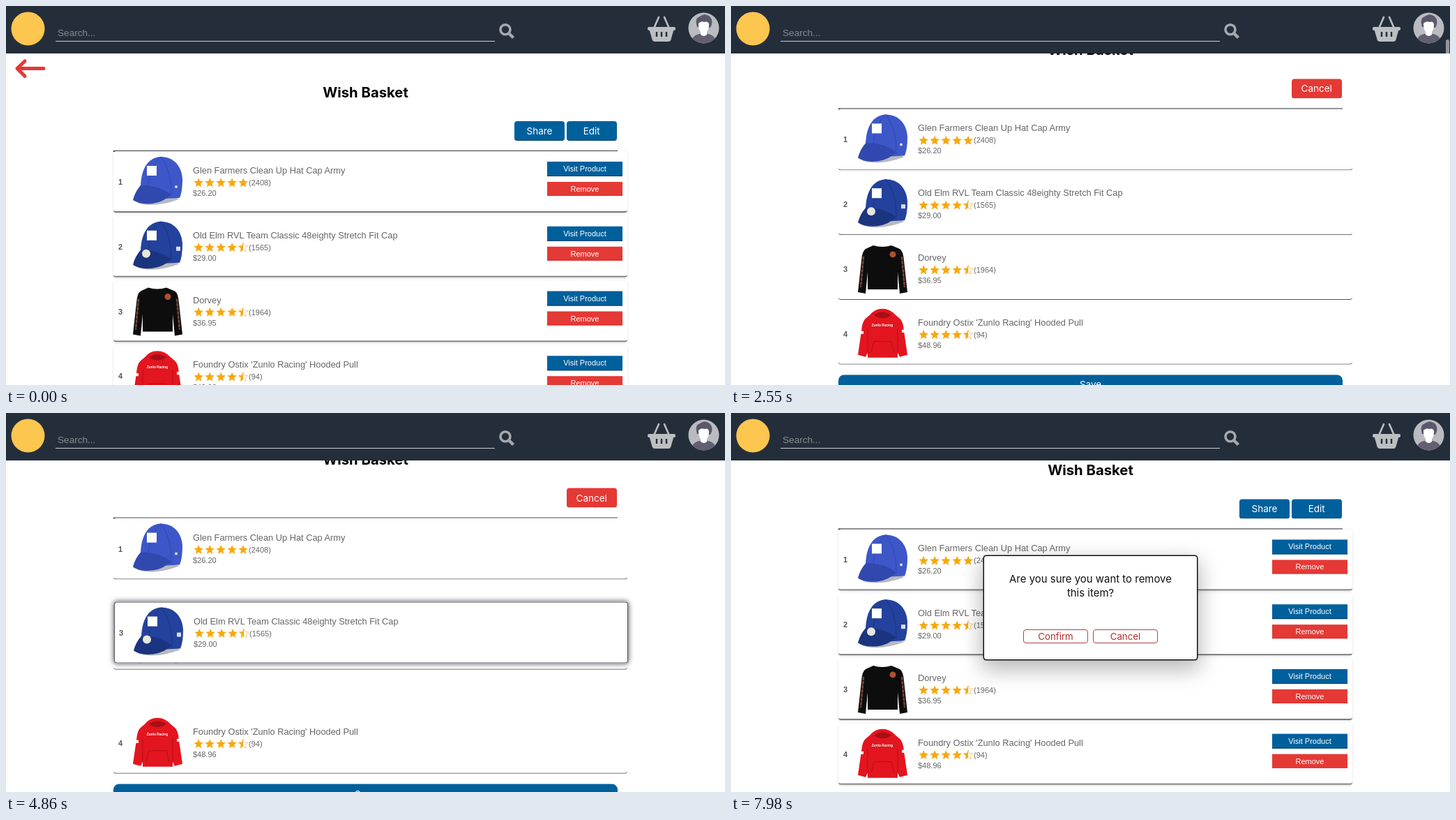
Animation, 1031 px wide and 543 px high, one loop 8 s. Source, as an HTML page:

```html
<!DOCTYPE html>
<html lang="en">
<head>
<meta charset="utf-8">
<title>Wish Basket</title>
<style>
html, body { margin: 0; width: 100%; height: 100%; overflow: hidden; background: #fff; }
body { position: relative; font: 11px "Liberation Sans", Arial, sans-serif; color: #666; }
div, svg { position: absolute; box-sizing: border-box; }
svg { overflow: visible; }
#page, #list { left: 0; top: 0; width: 1031px; }
#header { left: 0; top: -2px; width: 1031px; height: 70px; background: #242e3b; }
#header svg { left: 0; top: 2px; }
#search { left: 74px; top: 31px; font-size: 13.6px; line-height: 20px; color: #868a90; }
#thumb { left: 1025px; width: 5px; height: 440px; border-radius: 3px; background: rgba(255,255,255,.5); }
#title { left: 0; top: 109px; width: 1031px; text-align: center; color: #000; font: bold 20.3px/30px Inter, sans-serif; }
#rule { left: 154px; top: 207px; width: 723px; height: 2px; background: #3a3a40; }
.btn { text-align: center; color: #fff; background: #00609c; border-bottom: 1px solid #003a63; }
.big { top: 164.5px; height: 28.5px; border-radius: 4px; font: 13.5px/28px Inter, sans-serif; }
.red { background: #e53935; border-bottom-color: #d32f2f; }
.hover { background: #004f82; }
#save { left: 154px; top: 589px; width: 723px; border-radius: 8px; }
.card { left: 154px; top: 208px; width: 737px; height: 87.75px; background: #fff; border-radius: 4px; border-bottom: 1px solid #444; }
.view .card { border-bottom: 2px solid #777; box-shadow: 0 1px 3px rgba(0,0,0,.16); }
.card .text { white-space: nowrap; line-height: 20px; }
.name { font-size: 12.8px; }
.num { width: 20px; text-align: center; font-weight: bold; color: #555; }
.card .btn { left: 622px; width: 108px; }
.visit { top: 14.5px; height: 21.5px; line-height: 21px; }
.remove { top: 44px; height: 20px; line-height: 20px; }
.editOnly, .edit .viewOnly { display: none; }
.edit .editOnly { display: block; }
#modal { left: 362px; top: 204px; width: 307px; height: 150px; background: #fff; border: 1.5px solid #111;
  border-radius: 4px; box-shadow: 0 11px 30px 3px rgba(0,0,0,.28), 0 0 0 .5px #111; color: #111; text-align: center; font: 14.95px/19.5px Inter, sans-serif; }
#modal div { left: 0; width: 305px; top: 24px; }
#modal .choice { top: 105px; width: 93px; height: 20px; border: 1px solid #b04440; border-radius: 4px; color: #ac2f2b;
  font-size: 13.3px; line-height: 18px; }
</style>
</head>
<body>
<div id="page">
  <svg class="viewOnly" width="70" height="110" fill="none" stroke="#e53935" stroke-width="5" stroke-linecap="round" stroke-linejoin="round">
    <path d="M27 79 16 89.5 27 100.5M17 89.5H54"/></svg>
  <div id="title">Wish Basket</div>
  <div class="btn big viewOnly" style="left:729px;width:72px">Share</div>
  <div class="btn big viewOnly" id="edit" style="left:804px;width:71.5px">Edit</div>
  <div class="btn big red editOnly" style="left:804px;width:71.5px;top:165px;height:27.5px">Cancel</div>
  <div id="rule"></div>
  <div id="list"></div>
  <div class="btn big editOnly" id="save">Save</div>
</div>
<div id="header">
  <svg width="1031" height="68">
    <circle cx="31.5" cy="32.5" r="24" fill="#fdc64f"/>
    <path d="M71 50.5H701" stroke="#c9ccd0"/>
    <g fill="none" stroke="#a5a8ad" stroke-width="3.6"><circle cx="716" cy="33.8" r="7"/><path d="M721 39 727.5 45.5" stroke-width="4.5"/></g>
    <path d="M936 16 929 32M944 16 951 32" stroke="#bcbec1" stroke-width="2.6" stroke-linecap="round"/>
    <g fill="#bcbec1"><rect x="920" y="30" width="40" height="5" rx="2"/><path d="M922.5 34H957.5L953.5 48Q952.5 51 950 51H930Q927.5 51 926.5 48Z"/></g>
    <path d="M933 37V44M940 37V44M947 37V44" stroke="#242e3b" stroke-width="2.4"/>
    <clipPath id="round"><circle cx="1000.5" cy="31.5" r="22"/></clipPath>
    <g clip-path="url(#round)">
      <path d="M975 8H1025V56H975Z" fill="#babbc0"/>
      <path d="M983 54Q983 42 994 40H1007Q1018 42 1018 54Z" fill="#636073"/>
      <path d="M991 30Q987 17 995 15Q1002 9 1010 16Q1015 22 1010 31Z" fill="#5b586c"/>
      <path d="M993 25Q997 21 1001 23Q1007 21 1008 26Q1008 34 1005 37V41Q1001 45 996 41V37Q993 34 993 25Z" fill="#fff"/>
    </g>
  </svg>
  <div id="search">Search...</div>
</div>
<div id="thumb"></div>
<div id="modal">
  <div>Are you sure you want to remove<br>this item?</div>
  <div class="choice" style="left:56px">Confirm</div>
  <div class="choice" style="left:156px">Cancel</div>
</div>
<script>
const $ = id => document.getElementById(id);
const PITCH = 92.75;

const STAR = 'M12 17.27 18.18 21 16.54 13.97 22 9.24 14.81 8.63 12 2 9.19 8.63 2 9.24 7.46 13.97 5.82 21Z';
const HALF = 'M12 2 9.19 8.63 2 9.24 7.46 13.97 5.82 21 12 17.27Z';

const cap = (crown, brim, extra) => `
  <path d="M6 66Q30 74 66 61L55 54Z" fill="#b9bac0"/>
  <path d="M11 42C12 16 22 1 40 0C59 0 70 14 71 32Q71 50 67 59L46 60Z" fill="${crown}"/>
  <path d="M40 0Q56 20 55 57M40 0Q25 12 22 41" fill="none" stroke="${brim}"/>
  <path d="M11 41Q3 50 0 62Q10 69 28 67Q44 65 55 54Q36 40 11 41Z" fill="${brim}"/>
  <rect x="20" y="13" width="14" height="14" fill="#fff"/>${extra}`;
const sweater = color => `<path d="M22 2Q35 6 48 2L60 7Q65 10 66 24L71 69 60 71 57 40V65H14V40L11 71 0 69 5 24Q6 10 11 7Z" fill="${color}"/>`;
const hoodie = color => `<path d="M17 9Q24 0 35 0T54 9L60 14Q65 18 66 32L71 66 60 69 57 63V70H14V63L11 69 0 66 5 32Q6 18 11 14Z" fill="${color}"/>`;

const items = [
  { name: 'Glen Farmers Clean Up Hat Cap Army', stars: 5, votes: 2408, price: '26.20',
    art: cap('#3d57c9', '#3148ae', '<circle cx="62" cy="43" r="2" fill="#dde"/>') },
  { name: 'Old Elm RVL Team Classic 48eighty Stretch Fit Cap', stars: 4.5, votes: 1565, price: '29.00',
    art: cap('#23429d', '#1b3480', '<circle cx="19" cy="46" r="6" fill="#e8e6dc"/><rect x="62" y="36" width="6" height="6" fill="#dde"/>') },
  { name: 'Dorvey', stars: 4.5, votes: 1964, price: '36.95',
    art: sweater('#0d0d0e') + `<path d="M8 18 4 62M63 18 67 62" stroke="#7a4634" stroke-width="2.5" stroke-dasharray="5 1"/>
      <circle cx="50" cy="15" r="4.5" fill="#b0502f"/>` },
  { name: "Foundry Ostix 'Zunlo Racing' Hooded Pull", stars: 4.5, votes: 94, price: '48.96',
    art: hoodie('#e3151f') + `<path d="M23 9Q35 0 48 9Q35 18 23 9Z" fill="#a80e16"/>
      <path d="M14 28V63M57 28V63M19 63 23 47H48L52 63" fill="none" stroke="#b50f18"/>
      <text x="35" y="25" text-anchor="middle" font-size="4.8" font-weight="bold" fill="#fff">Zunlo Racing</text>
      <path d="M3 32H8V36H3ZM63 30H68V34H63Z" fill="#fff"/>` },
];

const text = (cls, x, midY, value) => `<div class="text ${cls}" style="left:${x}px;top:${midY - 10}px">${value}</div>`;
const star = (i, rating) => `<g transform="translate(${16 * i}) scale(.68)">` + (rating > i + .5
  ? `<path d="${STAR}" fill="#f7a80d"/>`
  : `<path d="${HALF}" fill="#f7a80d"/><path d="${STAR}" fill="none" stroke="#f2b64a"/>`) + '</g>';

const cards = items.map(item => {
  const card = document.createElement('div');
  card.className = 'card';
  card.innerHTML = text('num', 0, 43.5, '') +
    `<svg width="71" height="70" style="left:28px;top:8px">${item.art}</svg>` +
    text('name', 114, 28, item.name) +
    `<svg width="80" height="16" style="left:114px;top:37px">${[0, 1, 2, 3, 4].map(i => star(i, item.stars)).join('')}</svg>` +
    text('', 194, 44.7, `(${item.votes})`) + text('', 114, 60.3, '$' + item.price) +
    '<div class="btn visit viewOnly">Visit Product</div><div class="btn red remove viewOnly">Remove</div>';
  $('list').append(card);
  return card;
});

const ramp = (t, from, to) => Math.min(1, Math.max(0, (t - from) / (to - from)));
const easeOut = (u, power) => 1 - (1 - u) ** power;
const smooth = u => u * u * (3 - 2 * u);
const mix = (a, b, u) => a + (b - a) * u;
const between = (t, a, b) => t >= a && t < b;

const scrolls = [
  { start: 1695, end: 1920, to: 131.4 },
  { start: 2320, end: 2610, to: 57.4 },
  { start: 5295, end: 5640, to: 123 },
  { start: 6917, end: 7140, to: 41.6 },
];
const drags = [
  { lifted: 2, pushed: 1, start: 3375, drop: 3975, x: 15.6, y: -117.6 },
  { lifted: 1, pushed: 2, start: 4725, drop: 5150, x: 1.5, y: -95.3 },
];

function drawScroll(t) {
  let scroll = 0, thumb = 0;
  for (const { start, end, to } of scrolls) {
    if (t < start) break;
    scroll = mix(scroll, to, easeOut(ramp(t, start, end), 2));
    thumb = 1 - ramp(t, end + 450, end + 600);
  }
  $('page').style.transform = `translateY(${-scroll}px)`;
  $('thumb').style.top = scroll * .79 + 'px';
  $('thumb').style.opacity = thumb;
  // The rubber band at the bottom pulls the header along
  $('header').style.transform = `translateY(${between(t, 1890, 2220) ? -1 : 0}px)`;
}

function drawCards(t) {
  const poses = items.map((_, i) => ({ x: 0, y: i * PITCH, glow: 0, number: i + 1 }));
  for (const { lifted, pushed, start, drop, x, y } of drags) {
    if (t < start) break;
    const lift = easeOut(ramp(t, start, start + 420), 3);
    const fall = easeOut(ramp(t, drop, drop + 280), 3);
    const landed = fall === 1;
    poses[lifted] = {
      x: mix(x * lift, 0, fall),
      y: mix(2 * PITCH + y * lift, PITCH, fall),
      glow: ramp(t, start, start + 90) - ramp(t, drop, drop + 490),
      number: landed ? 2 : 3,
    };
    poses[pushed] = {
      x: 0, y: PITCH * (1 + smooth(ramp(t, start + 75, start + 215))),
      glow: 0, number: landed ? 3 : 2,
    };
  }
  cards.forEach((card, i) => {
    const { x, y, glow, number } = poses[i];
    card.querySelector('.num').textContent = number;
    card.style.transform = `translate(${x}px, ${y}px)`;
    card.style.zIndex = glow ? 2 : 1;
    card.style.boxShadow = glow
      ? `inset 0 0 0 1px rgba(70,70,75,${glow}), 0 0 ${3 + 4 * glow}px ${glow}px rgba(45,45,60,${.3 + .45 * glow})` : '';
    card.style.borderBottomWidth = glow ? '0' : '';
  });
}

function render(t) {
  document.body.className = between(t, 1350, 6480) ? 'edit' : 'view';
  drawScroll(t);
  drawCards(t);
  $('edit').classList.toggle('hover', between(t, 990, 1350));
  $('save').classList.toggle('hover', between(t, 6090, 6480));
  cards[1].querySelector('.visit').classList.toggle('hover', between(t, 7350, 7590));
  $('modal').style.display = t >= 7980 ? 'block' : 'none';
}

function loop() {
  render(Math.floor(performance.now() % 8000 / 30) * 30);
  requestAnimationFrame(loop);
}
loop();
</script>
</body>
</html>
```
